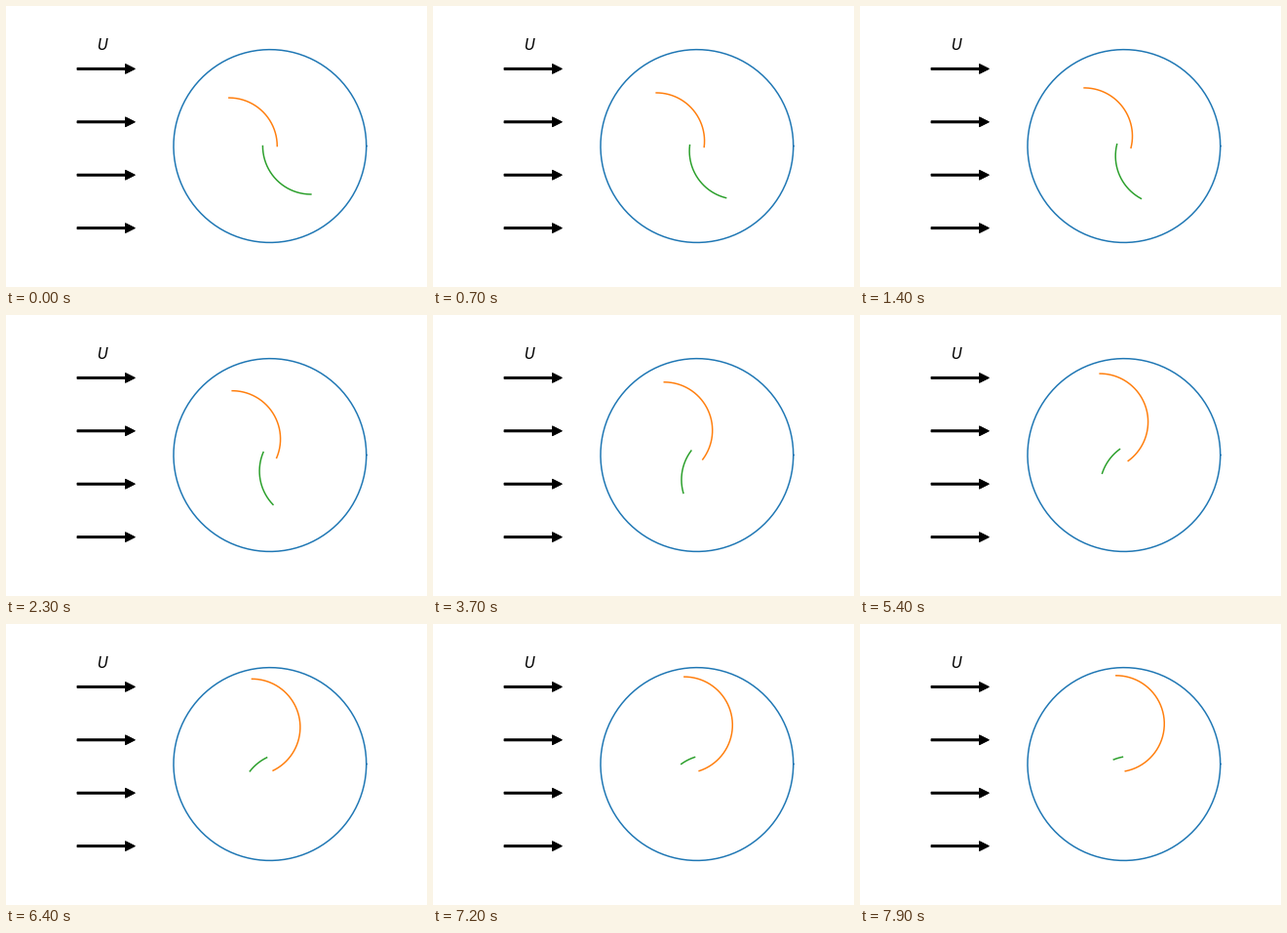
Write a matplotlib script that moves like this. It is 432 px wide and 288 px high and loops after 8 s.

```python
import numpy as np
import matplotlib.pyplot as plt
from matplotlib.animation import FuncAnimation

W, H, DPI = 432, 288, 72
SCALE = 98.9                # pixels per rotor radius
CX, CY = 270.85, 144.46     # rotor axis, pixels from bottom left
BLADE_R = 0.5
OFFSET = 0.425              # blade centre to rotor axis
FRAMES = 80                 # one degree each

fig = plt.figure(figsize=(W / DPI, H / DPI), dpi=DPI)
ax = fig.add_axes([0, 0, 1, 1])
ax.set_xlim(-CX / SCALE, (W - CX) / SCALE)
ax.set_ylim(-CY / SCALE, (H - CY) / SCALE)
ax.axis("off")


def arc(cx, cy, r, start, end):
    t = np.radians(np.linspace(start, end, 200))
    return cx + r * np.cos(t), cy + r * np.sin(t)


ax.plot(*arc(0, 0, 1, 0, 360), color="C0")
upper, = ax.plot([], [], color="C1")
lower, = ax.plot([], [], color="C2")

for y in (0.8, 0.25, -0.3, -0.85):
    ax.arrow(-2, y, 0.5, 0, width=0.02, head_width=0.1, head_length=0.1,
             color="black")
ax.text(-1.8, 1.0, "$U$", fontsize=15)


def update(deg):
    a = np.radians(deg)
    x, y = OFFSET * np.cos(a), OFFSET * np.sin(a)
    upper.set_data(*arc(-x, y, BLADE_R, -deg, 90))
    lower.set_data(*arc(x, -y, BLADE_R, 180 - deg, 270 - 2 * deg))
    return upper, lower


anim = FuncAnimation(fig, update, frames=FRAMES, interval=100, repeat=True)
plt.show()
```
